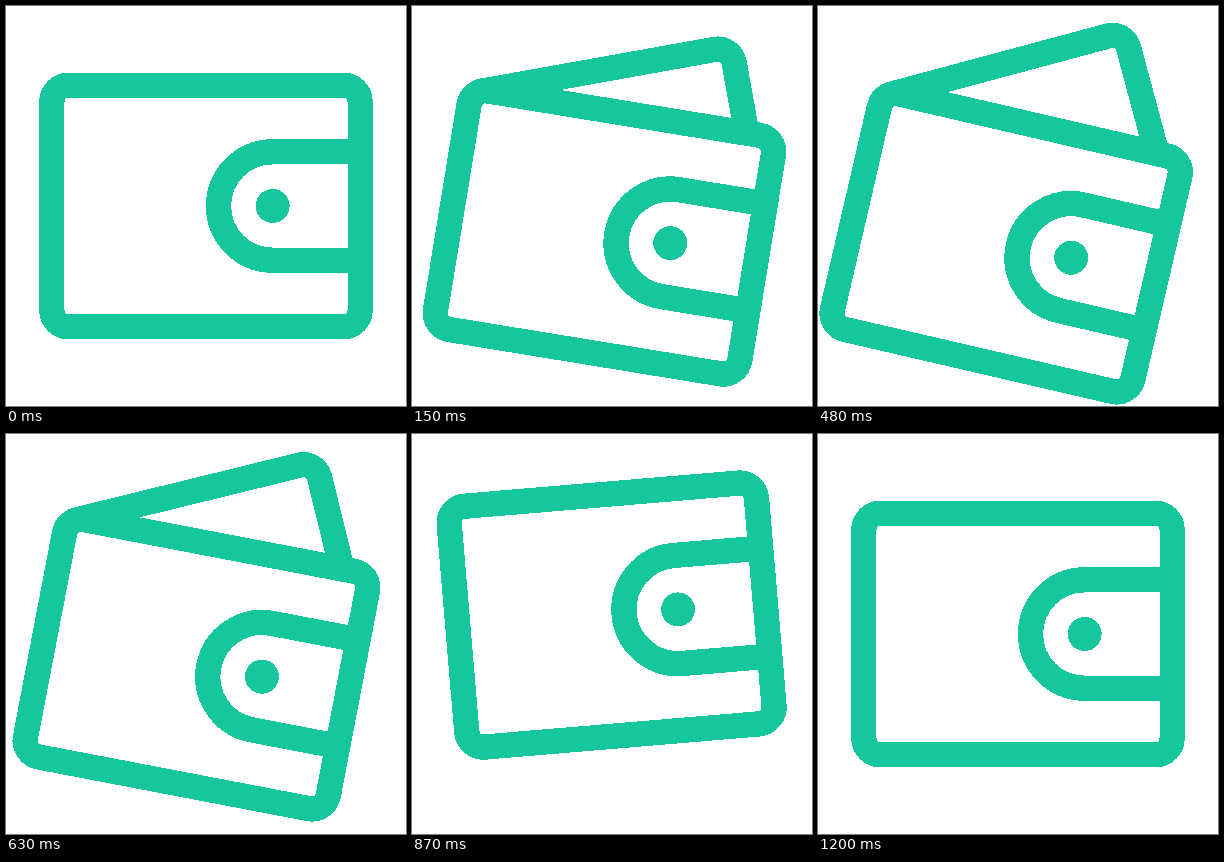
These frames come from a looping animation (400 by 400 pixels, 3.23 s). An HTML page:

```html
<!DOCTYPE html>
<html lang="en">
<head>
<meta charset="utf-8">
<title>Wallet</title>
<style>
html, body { margin: 0; height: 100%; overflow: hidden; background: #fff; }
svg { display: block; width: 100%; height: 100%; shape-rendering: crispEdges; }
</style>
</head>
<body>
<svg viewBox="0 0 400 400" fill="none" stroke="#16c79e" stroke-width="25.3">
  <g id="wallet">
    <path id="card"/>
    <rect x="45.83" y="79.17" width="308.34" height="241.66" rx="16.67" fill="#fff"/>
    <path d="M354.17 145.83H266.67a54.17 54.17 0 0 0 0 108.34H354.17"/>
    <circle cx="266.67" cy="200" r="17" fill="#16c79e" stroke="none"/>
  </g>
</svg>
<script>
const LOOP = 3230, STEP = 30;
const wallet = document.getElementById('wallet');
const card = document.getElementById('card');

const progress = (t, from, to) => Math.min(1, Math.max(0, (t - from) / (to - from)));
const smooth = u => u * u * (3 - 2 * u);

// Cubic Bezier (1/6, 1/6, 0, 1): quick start, long settling
function settle(u) {
  let lo = 0, hi = 1;
  for (let i = 0; i < 30; i++) {
    const s = (lo + hi) / 2;
    if (s * (1 - s) ** 2 / 2 + s ** 3 < u) lo = s; else hi = s;
  }
  return u >= 1 ? 1 : lo * (1 - lo) ** 2 / 2 + 3 * (1 - lo) * lo * lo + lo ** 3;
}

function draw(t) {
  const open = settle(progress(t, 0, 550));
  const swing = smooth(progress(t, 558, 882));
  const back = smooth(progress(t, 882, 1200));
  const tilt = 13.1 * open - 18 * swing + 4.9 * back;
  const lift = swing - back;
  wallet.setAttribute('transform',
    `translate(${-2.6 * lift} ${-4.8 * lift}) rotate(${tilt} 33.33 166.67)`);

  // The card turns about the top left corner and slides in as it opens
  const fan = 28.2 * (settle(progress(t, 10, 550)) - smooth(progress(t, 572, 832)));
  const width = 262 - 1.34 * fan;
  card.setAttribute('transform', `translate(62.5 95.83) rotate(${-fan})`);
  card.setAttribute('d', `M0 -16.67H${width}a16.67 16.67 0 0 1 16.67 16.67v130`);
}

const start = performance.now();
function tick() {
  const t = (performance.now() - start) % LOOP;
  draw(Math.floor(t / STEP) * STEP);
  requestAnimationFrame(tick);
}
tick();
</script>
</body>
</html>
```
